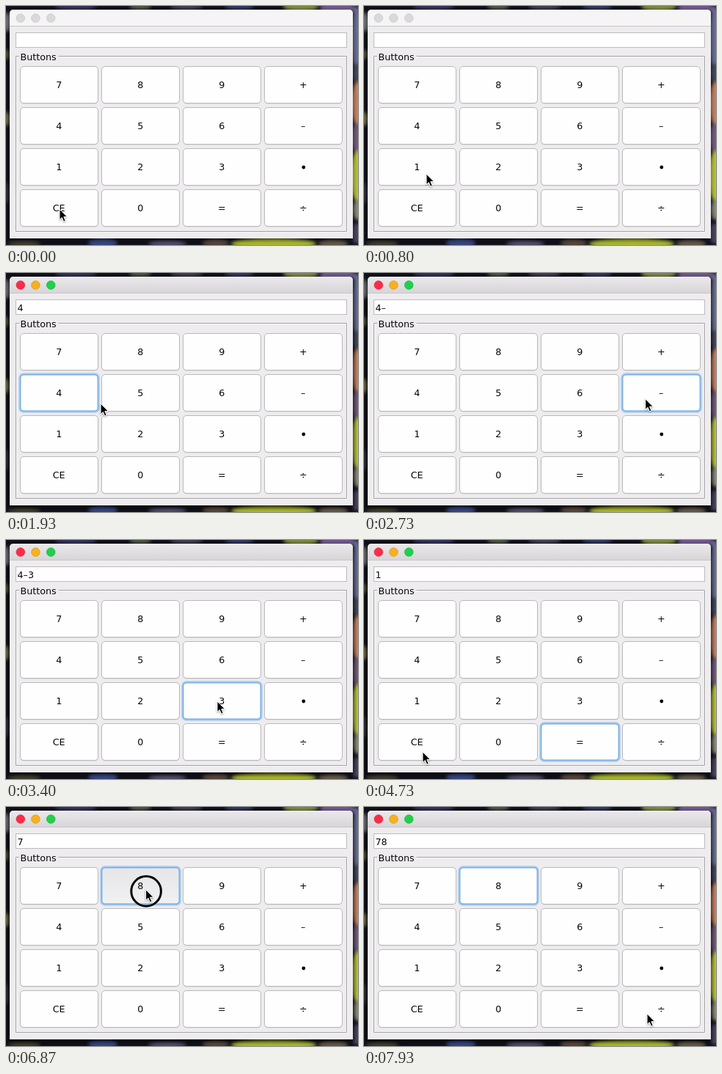
These frames come from a looping animation (480x326 px, 8000 ms). An HTML page:

```html
<!DOCTYPE html>
<html lang="en">
<head>
<meta charset="utf-8">
<title>Calculator</title>
<style>
  html, body { margin: 0; width: 100%; height: 100%; overflow: hidden; background: #11111c; }
  svg { display: block; width: 480px; height: 326px; }
  text { font: 12.7px "DejaVu Sans", sans-serif; fill: #080808; }
  .label { text-anchor: middle; }
  .key { fill: #fefefe; stroke: #b9b9bb; }
  .key.pressed { fill: url(#pressed); }
  .titlebar { fill: #f6f5f6; }
  .light { fill: #dad8da; stroke: #c9c7c9; stroke-width: .8; }
  .shade { opacity: .25; }
  .active .shade { opacity: .5; }
  .active .titlebar { fill: url(#bar); }
  .active .light { fill: var(--on); stroke: var(--edge); }
</style>
</head>
<body>
<svg id="stage" viewBox="0 0 480 326">
  <defs>
    <linearGradient id="bar" x2="0" y2="1">
      <stop stop-color="#ebe9eb"/><stop offset="1" stop-color="#d6d4d6"/>
    </linearGradient>
    <linearGradient id="pressed" x2="0" y2="1">
      <stop stop-color="#e6e6e8"/><stop offset="1" stop-color="#f1f1f2"/>
    </linearGradient>
    <filter id="soft" x="-30%" y="-30%" width="160%" height="160%"><feGaussianBlur stdDeviation="2"/></filter>
    <filter id="drop" x="-60%" y="-60%" width="220%" height="220%">
      <feDropShadow dx="0" dy="1" stdDeviation="1" flood-opacity=".4"/>
    </filter>
  </defs>

  <rect width="480" height="326" fill="#11111c"/>
  <g id="wallpaper" filter="url(#soft)"></g>
  <rect class="shade" x="2" y="6" width="474" height="315" rx="6" filter="url(#soft)"/>

  <path d="M5 317V10a5 5 0 0 1 5-5H468a5 5 0 0 1 5 5V317Z" fill="#eeecee"/>
  <path class="titlebar" d="M5 28V10a5 5 0 0 1 5-5H468a5 5 0 0 1 5 5V28Z"/>
  <path d="M5 27.5H473" stroke="#c9c7c9"/>
  <circle class="light" cx="19.8" cy="16.5" r="5.8" style="--on:#fb2c47;--edge:#e0263e"/>
  <circle class="light" cx="40.4" cy="16.5" r="5.8" style="--on:#f8b01e;--edge:#dc9a19"/>
  <circle class="light" cx="61.2" cy="16.5" r="5.8" style="--on:#20d04b;--edge:#1bb540"/>

  <rect x="13.5" y="36.5" width="451" height="20" fill="#fefefe" stroke="#bcbcbe"/>
  <text id="display" x="15.5" y="51.5"></text>
  <path d="M18 68.5H13.5V307.5H464.5V68.5H71.5" fill="none" stroke="#a3a2a4"/>
  <path d="M14.5 306V69.5H18M71.5 69.5H463M465.5 69V308.5H13" fill="none" stroke="#f9f8f9"/>
  <text x="19.5" y="74">Buttons</text>

  <g id="keys"></g>
  <g id="ring" fill="none">
    <rect x="-1" y="-1" width="108" height="52" rx="5.5" stroke="#a9cdef" stroke-width="2.6"/>
    <rect x=".2" y=".2" width="105.6" height="49.6" rx="4.5" stroke="#74aee4" stroke-width="1.4"/>
  </g>
  <circle id="halo" r="20.3" fill="none" stroke="#050505" stroke-width="3"/>
  <path id="pointer" d="M0 0V14.6L3.3 11.6L5.7 17.2L8.2 16.1L5.8 10.6H10.4Z"
        stroke="#fff" stroke-width="1" stroke-linejoin="round" filter="url(#drop)"/>
</svg>
<script>
const LOOP = 8000, FPS = 15;
const stage = document.getElementById('stage');
const [display, ring, halo, pointer] = ['display', 'ring', 'halo', 'pointer']
  .map(id => document.getElementById(id));

function add(parent, tag, attrs, content) {
  const node = document.createElementNS('http://www.w3.org/2000/svg', tag);
  for (const name in attrs) node.setAttribute(name, attrs[name]);
  if (content) node.textContent = content;
  return document.getElementById(parent).appendChild(node);
}

// Blurred paint patches: x, y, rx, ry, colour
[
  [2, 22, 5, 13, '#77777f'], [1, 66, 4, 7, '#55533b'], [1, 154, 4, 10, '#77754f'],
  [1, 255, 4, 15, '#30303b'], [95, 1, 28, 5, '#34335c'], [183, 1, 15, 4, '#51584a'],
  [246, 1, 22, 4, '#454052'], [318, 1, 20, 4, '#343b66'], [402, 1, 24, 6, '#7b8740'],
  [452, 3, 24, 9, '#6e568d'], [478, 45, 7, 45, '#6b7199'], [478, 91, 6, 13, '#454b60'],
  [479, 133, 8, 30, '#c98361'], [478, 180, 7, 20, '#765c80'], [479, 232, 9, 35, '#b9c437'],
  [479, 278, 6, 14, '#8c8b76'], [478, 310, 7, 14, '#4d4564'], [25, 324, 22, 4, '#42412f'],
  [132, 323, 20, 6, '#39477f'], [220, 324, 26, 4, '#55516d'], [286, 323, 18, 5, '#5a493e'],
  [365, 324, 58, 7, '#a9b72d'], [446, 324, 20, 5, '#665a49']
].forEach(([cx, cy, rx, ry, fill]) => add('wallpaper', 'ellipse', { cx, cy, rx, ry, fill }));

const keys = {};
[...'789+456–123•', 'CE', ...'0=÷'].forEach((name, i) => {
  const x = 19.5 + i % 4 * 111, y = 82.5 + (i >> 2) * 56;
  add('keys', 'rect', { x, y: y + 1, width: 106, height: 50, rx: 4.5, fill: '#d2d1d3' });
  const face = add('keys', 'rect', { class: 'key', x, y, width: 106, height: 50, rx: 4.5 });
  if (name === '•') add('keys', 'circle', { cx: x + 53.3, cy: y + 25.5, r: 2.4 });
  else add('keys', 'text', { class: 'label', x: x + 52.7, y: y + 29.7 }, name);
  keys[name] = { x, y, face };
});

// Press time, release time, key, display after release
const clicks = [
  [1400, 1600, '4', '4'], [2400, 2600, '–', '4–'], [3130, 3330, '3', '4–3'],
  [3870, 4070, '=', '1'], [4930, 5130, 'CE', ''], [5860, 6060, '7', '7'],
  [6730, 6930, '8', '78']
];

// Time, x, y of the pointer tip
const path = [
  [0, 73, 277], [130, 73, 277], [800, 85, 229], [1330, 99, 166], [1660, 101, 167],
  [1930, 129, 178], [2330, 393, 166], [2660, 393, 167], [3060, 288, 220], [3460, 288, 220],
  [3800, 289, 277], [4130, 289, 278], [4730, 80, 289], [4870, 77, 283], [5200, 77, 282],
  [5800, 95, 112], [6130, 95, 112], [6600, 190, 112], [7060, 191, 113], [7930, 386, 282],
  [8000, 386, 282]
];

function pointerAt(t) {
  const i = path.findIndex(p => p[0] > t);
  const [t0, x0, y0] = path[i - 1], [t1, x1, y1] = path[i];
  const u = (t - t0) / (t1 - t0), e = u * u * (3 - 2 * u);
  return [x0 + (x1 - x0) * e, y0 + (y1 - y0) * e];
}

const show = (node, on) => node.setAttribute('visibility', on ? 'visible' : 'hidden');
const place = (node, x, y) => node.setAttribute('transform', `translate(${x} ${y})`);

function draw(now) {
  const t = Math.floor((now % LOOP) * FPS / 1000 + .06) * 1000 / FPS % LOOP;
  const [x, y] = pointerAt(t);
  let focus = null, pressed = null, value = '';
  for (const [down, up, name, result] of clicks) {
    if (t < down) break;
    focus = keys[name];
    pressed = t < up ? focus : null;
    if (t >= up) value = result;
  }
  stage.classList.toggle('active', !!focus);
  for (const name in keys) keys[name].face.classList.toggle('pressed', keys[name] === pressed);
  display.textContent = value;
  show(ring, focus);
  if (focus) place(ring, focus.x, focus.y);
  show(halo, pressed);
  place(halo, x + .5, y + 2.3);
  place(pointer, x, y);
}

const start = performance.now();
function tick() {
  draw(performance.now() - start);
  requestAnimationFrame(tick);
}
tick();
</script>
</body>
</html>
```
